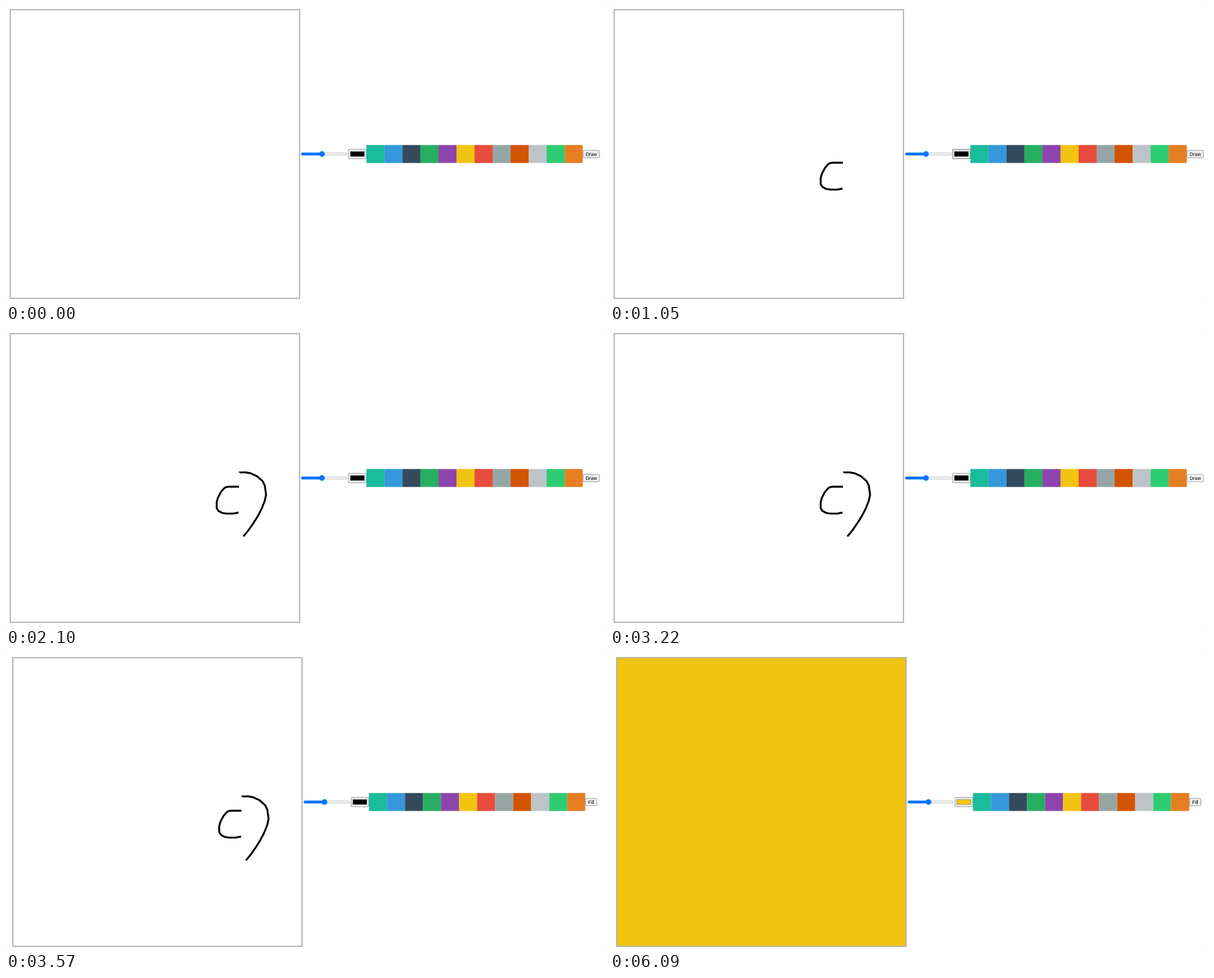
An HTML page for the animation above (6.37 s loop, 1063 by 527 pixels).

```html
<!DOCTYPE html>
<html lang="en">
<head>
<meta charset="utf-8">
<title>Drawing board</title>
<style>
  html, body { margin: 0; width: 100%; height: 100%; overflow: hidden; background: #fff; }
  svg { display: block; width: 1063px; height: 527px; }
  text { font: 8.53px "Liberation Sans", Arial, sans-serif; text-anchor: middle; }
  .ink { fill: none; stroke: #000; stroke-width: 3.4; stroke-miterlimit: 10; }
  .control { fill: #efefef; stroke: #767676; stroke-width: .8; }
  .control.hover { fill: #e5e5e5; stroke: #4f4f4f; }
  .control.active { fill: #f5f5f5; stroke: #8d8d8d; }
</style>
</head>
<body>
<svg viewBox="0 0 1063 527">
  <path d="M0 0h1v1h-1zM1062 0h1v1h-1zM0 526h1v1h-1zM1062 526h1v1h-1z" fill="#b5b5b5"/>
  <g id="page">
    <rect id="board" x="7.55" y="6.5" width="514.2" height="514" fill="#fff" stroke="#a9a9a9" stroke-width="1.9"/>
    <g id="drawing">
      <path id="curl" class="ink" d="M414 279H395L391 279.8 388 281.5 382 288.5 376.5 299 374.5 306.5V317L377.5 322 384 325.6 392 326.9H404L413.3 325"/>
      <path id="arc" class="ink" d="M417.6 254.4L416.9 253.6 426 253.5 435 255.2 446 260.3 456 269 460 277 462.3 293 460 304 454.5 318 447 332.5 440 343.5 431 356.5 422 367.5"/>
    </g>
    <rect x="525" y="261.4" width="81.9" height="4.4" rx="2.2" fill="#efefef" stroke="#b2b2b2" stroke-width=".65"/>
    <rect x="524.6" y="261" width="38" height="5.1" rx="2.5" fill="#0075ff"/>
    <circle cx="561.6" cy="263.5" r="5.1" fill="#0075ff"/>
    <rect id="picker" class="control" x="608.9" y="255.2" width="31.4" height="16.7" rx="1"/>
    <rect id="chosen" x="612.1" y="259" width="25" height="9" stroke="#777" stroke-width=".65"/>
    <g id="palette"></g>
    <rect id="button" class="control" x="1025.7" y="257" height="13.2" rx="1.8"/>
    <text id="label" y="266.6"></text>
  </g>
</svg>
<script>
const LOOP = 6370, STEP = 70, YELLOW = '#f1c40f';
const $ = id => document.getElementById(id);

const colours = ['#1abc9c', '#3498db', '#34495e', '#27ae60', '#8e44ad', YELLOW,
  '#e74c3c', '#95a5a6', '#d35400', '#bdc3c7', '#2ecc71', '#e67e22'];
$('palette').innerHTML = colours.map((c, i) =>
  `<rect x="${640.7 + 32.04 * i}" y="247.5" width="32.04" height="32" fill="${c}"/>`).join('');

const clamp = v => Math.min(1, Math.max(0, v));
const smooth = v => v * v * (3 - 2 * v);
const between = (t, a, b) => t >= a && t < b;
const set = (id, attrs) => {
  for (const k in attrs) $(id).setAttribute(k, attrs[k]);
};

// Pointer samples arrive every STEP ms; 0 means the stroke has not begun.
const samples = (t, start) => Math.max(0, Math.floor((t - start) / STEP) + 1);

function reveal(id, part) {
  const length = $(id).getTotalLength();
  set(id, {
    visibility: part > 0 ? 'inherit' : 'hidden',
    'stroke-dasharray': part < 1 ? `${length * part} ${length * 2}` : 'none'
  });
}

function render(t) {
  const fillMode = t >= 3360, filled = t >= 6090;
  const width = fillMode ? 20.2 : 29.3;
  set('page', { transform: `translate(${fillMode ? 4.5 : 0})` });

  const curl = samples(t, 140), arc = samples(t, 1680);
  reveal('curl', curl && clamp((curl - .3) * .109));
  reveal('arc', arc && Math.max(.006, smooth(clamp((arc - 1) / 6))));
  set('drawing', { visibility: filled ? 'hidden' : 'visible' });
  set('board', { fill: filled ? YELLOW : '#fff' });

  set('picker', { class: between(t, 1050, 1120) ? 'control hover' : 'control' });
  set('chosen', { fill: t >= 4830 ? YELLOW : '#000' });

  const state = between(t, 3220, 3360) ? 'active' : between(t, 2940, 3570) ? 'hover' : '';
  set('button', { class: `control ${state}`, width });
  set('label', { x: 1025.7 + width / 2 });
  $('label').textContent = fillMode ? 'Fill' : 'Draw';
}

const begin = performance.now();
function frame(now) {
  render(Math.max(0, now - begin) % LOOP);
  requestAnimationFrame(frame);
}
render(0);
requestAnimationFrame(frame);
</script>
</body>
</html>
```
